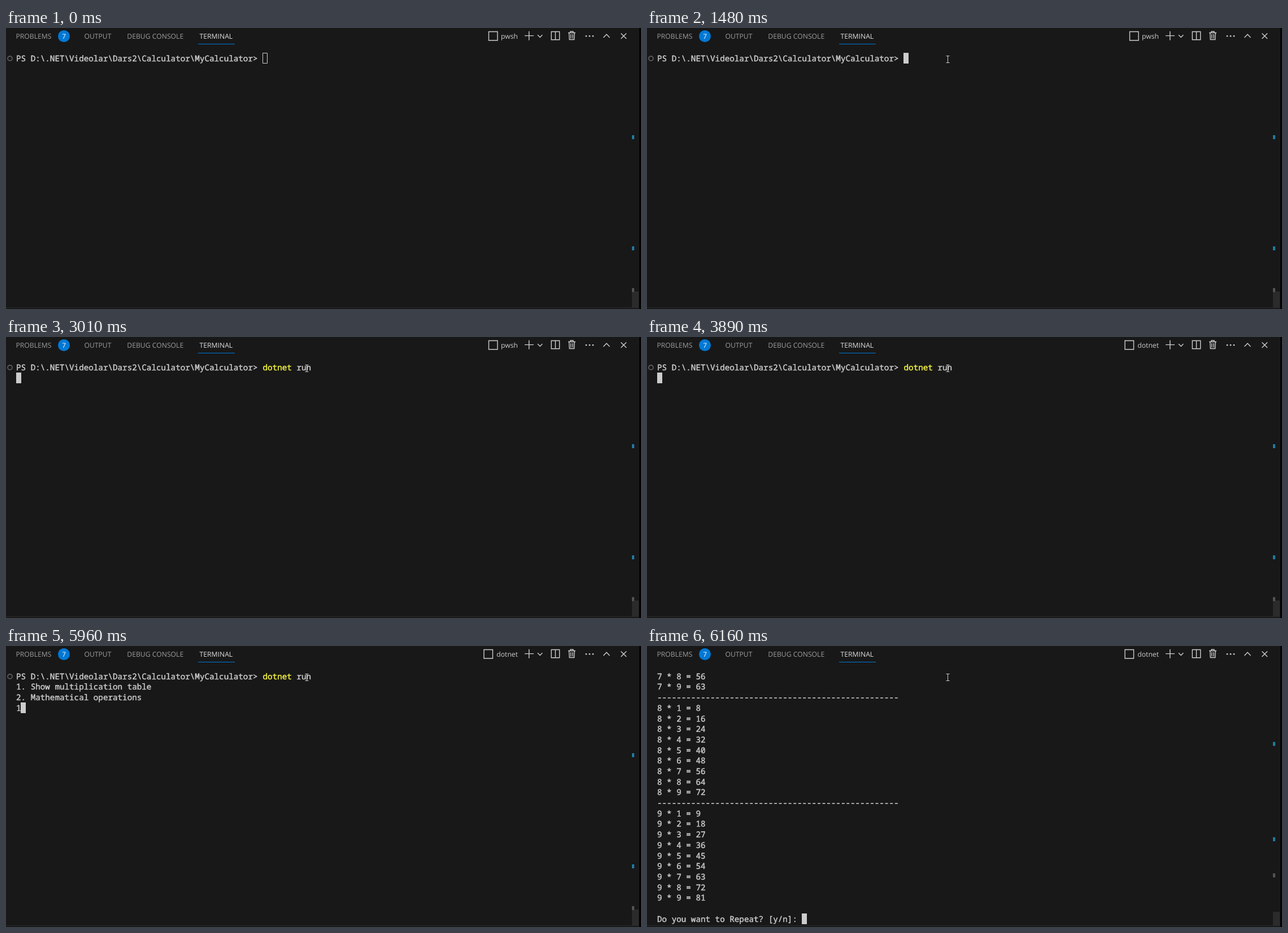
Write an HTML page with a canvas that moves like this. It is 1124 px wide and 498 px high and loops after 8000 ms.

```html
<!DOCTYPE html>
<html lang="en">
<head>
<meta charset="utf-8">
<title>Terminal</title>
<style>
  html, body { margin: 0; width: 100%; height: 100%; overflow: hidden; background: #181818; }
  canvas { display: block; }
</style>
</head>
<body>
<canvas id="stage" width="1124" height="498"></canvas>
<script>
const ctx = document.getElementById('stage').getContext('2d');
const LOOP = 8000;
const COL = 8.56, ROW = 18.69, LEFT = 18, TOP = 44;
const FG = '#cccccc', DIM = '#9d9d9d', BLUE = '#0078d4', YELLOW = '#f5f543';
const MONO = '14.26px "Noto Sans Mono", monospace';
const UI = '12.2px "Open Sans", sans-serif';
const PROMPT = 'PS D:\\.NET\\Videolar\\Dars2\\Calculator\\MyCalculator> ';
const QUESTION = 'Do you want to Repeat? [y/n]: ';

const products = n => Array.from({ length: 9 }, (_, i) => `${n} * ${i + 1} = ${n * (i + 1)}`);
const rule = '-'.repeat(50);
const table = [...products(7).slice(7), rule, ...products(8), rule, ...products(9), '', QUESTION];

function rect(x, y, w, h, color) {
  ctx.fillStyle = color;
  ctx.fillRect(x, y, w, h);
}

function text(str, x, y, color, font, align = 'left') {
  ctx.font = font;
  ctx.fillStyle = color;
  ctx.textAlign = align;
  ctx.fillText(str, x, y);
}

function lines(d, color = FG, width = 1.4) {
  ctx.strokeStyle = color;
  ctx.lineWidth = width;
  ctx.stroke(new Path2D(d));
}

function disc(x, y, r, color) {
  ctx.fillStyle = color;
  ctx.beginPath();
  ctx.arc(x, y, r, 0, 2 * Math.PI);
  ctx.fill();
}

// Terminal text; a thin outline gives it a slightly heavier weight.
function print(str, row, col = 0, color = FG) {
  const x = LEFT + col * COL, y = 58.8 + row * ROW;
  text(str, x, y, color, MONO);
  ctx.strokeStyle = color;
  ctx.lineWidth = .45;
  ctx.strokeText(str, x, y);
}

function block(row, col, focused = true) {
  const x = Math.floor(LEFT + col * COL), y = Math.round(TOP + row * ROW);
  if (focused) rect(x, y, 9, 19, FG);
  else lines(`M${x + .5} ${y + .5}h8v18h-8z`, FG, 1);
}

function header(process) {
  text('PROBLEMS', 17.5, 19.3, DIM, UI);
  text('OUTPUT', 138.4, 19.3, DIM, UI);
  text('DEBUG CONSOLE', 214.3, 19.3, DIM, UI);
  text('TERMINAL', 342.5, 19.3, '#e0e0e0', UI);
  rect(340, 28, 65, 1, BLUE);
  disc(102.5, 14.5, 10.5, BLUE);
  text('7', 102.5, 18.6, '#ffffff', '11.8px "Open Sans", sans-serif', 'center');

  text(process, 906, 19.3, FG, UI, 'right');
  const iconX = process === 'pwsh' ? 854.5 : 846;
  lines(`M${iconX} 6.5h15.5v15.5h-15.5z`);
  lines('M918 13.6h16M925.8 5.8v16');
  lines('M941 12.2l4.2 4.2l4.2-4.2');
  lines('M965.3 6.5h14.4v14.2h-14.4zM972.5 6.5v14.2');
  lines('M995 8.5h13M999 8.5v-2.2h5v2.2M996.7 8.5l.6 12h8.4l.6-12M999.8 11v7.5M1003.2 11v7.5');
  for (const x of [1027, 1033, 1039]) disc(x, 14.3, 1.4, FG);
  lines('M1057.5 17l5.5-5.8l5.5 5.8');
  lines('M1088.5 9.5l9.6 9.6M1098.1 9.5l-9.6 9.6');
}

function ruler(marks, sliderY) {
  rect(1108, sliderY, 12, 495 - sliderY, '#2b2b2b');
  marks.forEach((y, i) => rect(1108, y, 4, 7, i < 2 ? '#1f7da3' : '#555555'));
  rect(0, 495, 1120, 1, '#2b2b2b');
  rect(1121, 0, 3, 498, '#000000');
}

function arrow(x, y) {
  const shape = new Path2D(`M${x} ${y}v11.6l2.7-2.5l1.9 4.3l1.9-.8l-1.9-4.2h3.6z`);
  ctx.strokeStyle = '#000000';
  ctx.lineWidth = 1.5;
  ctx.stroke(shape);
  ctx.fillStyle = '#ffffff';
  ctx.fill(shape);
}

function beam(x, y) {
  lines(`M${x - 2.5} ${y - 5.5}h6M${x + .5} ${y - 5.5}v12M${x - 2.5} ${y + 6.5}h6`, '#cccccc', 1);
}

// Progress from 0 to 1 in the given number of equal, held steps.
const stepped = (t, start, end, steps) =>
  Math.min(1, Math.floor((t - start) / (end - start) * (steps - 1) + 1e-6) / (steps - 1));
const mix = (a, b, p) => a + (b - a) * p;

function pointer(t) {
  if (t < 70) return;
  if (t < 1160) {
    const p = 1 - (1 - stepped(t, 70, 540, 8)) ** 3;
    arrow(mix(1090, 541.5, p), mix(440, 43, p));
  } else {
    const p = stepped(t, 1160, 1480, 5);
    if (p < .25) arrow(540, 45);
    else beam(mix(538, 532, p), mix(49, 55, p));
  }
}

function terminal(t) {
  if (t >= 6090) {
    table.forEach((line, row) => print(line, row));
    if (t >= 6160) block(23, QUESTION.length);
    return;
  }

  lines('M3 54a4 4 0 1 0 8 0a4 4 0 1 0-8 0', '#5a5a5a', 1.8);
  print(PROMPT, 0);
  const col = PROMPT.length;
  if (t < 2080) block(0, col, t >= 1480);
  else if (t >= 2150 && t < 2610) {
    print('clear', 0, col, YELLOW);
    if (t < 2540) block(0, col + 5);
  } else if (t >= 2610) {
    print('dotnet', 0, col, YELLOW);
    print('run', 0, col + 7);
    if (t < 3010) block(0, col + 10);
    else if (t < 4820) block(1, 0);
    else {
      print('1. Show multiplication table', 1);
      print('2. Mathematical operations', 2);
      if (t >= 5960) print('1', 3);
      block(3, t >= 5960 ? 1 : 0);
    }
  }
}

function draw(t) {
  rect(0, 0, 1124, 498, '#181818');
  header(t < 3890 ? 'pwsh' : 'dotnet');
  if (t < 6160) ruler([190, 387, 461], 467);
  else ruler([170, 339, 403], 471);
  terminal(t);
  pointer(t);
}

ctx.textRendering = 'geometricPrecision';
const start = performance.now();
function frame() {
  draw((performance.now() - start) % LOOP);
  requestAnimationFrame(frame);
}
frame();
</script>
</body>
</html>
```
